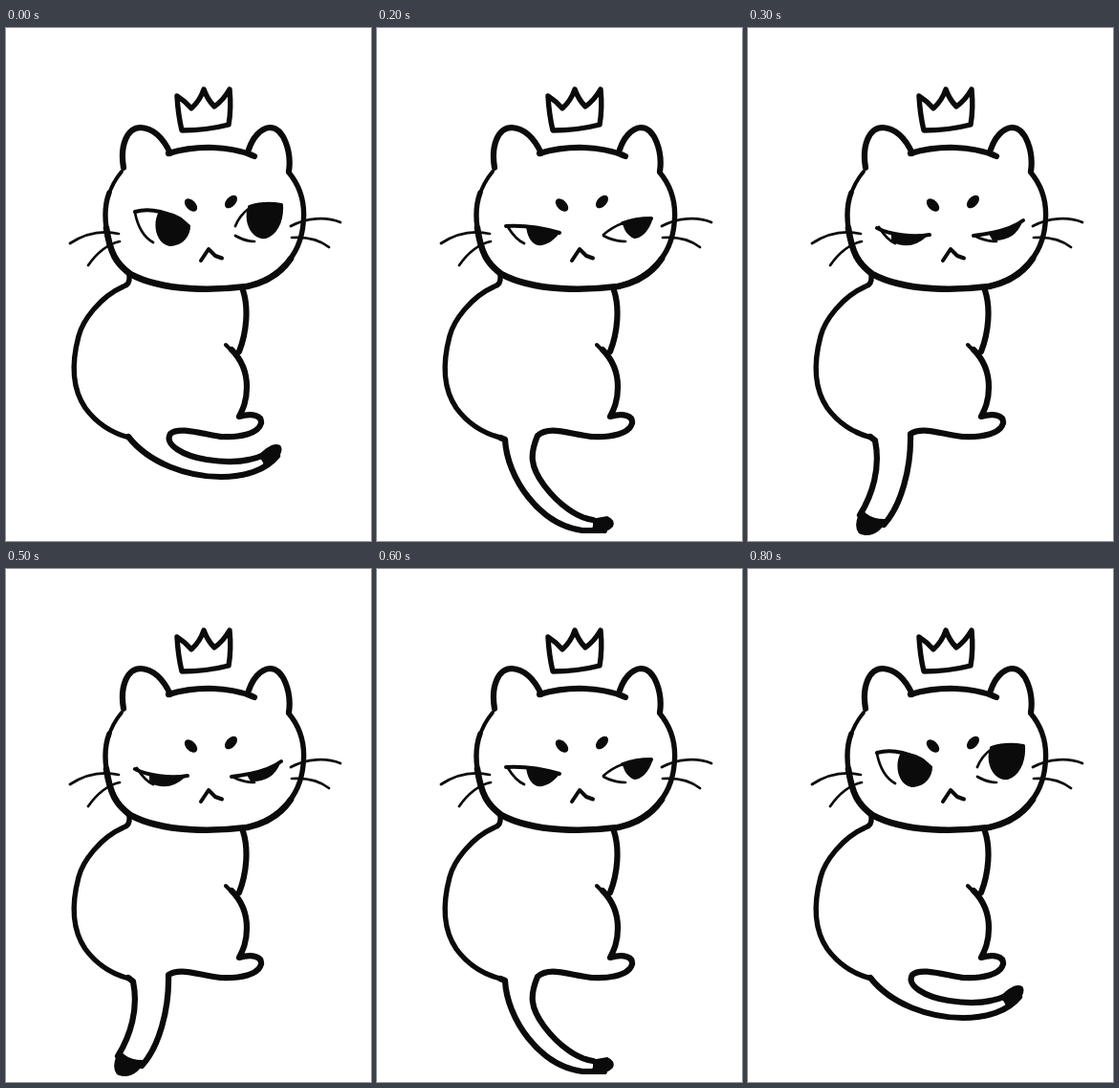
An HTML page that plays this animation: 382 by 536 pixels, repeating every 1 s.

```html
<!DOCTYPE html>
<html lang="en">
<head>
<meta charset="utf-8">
<title>Crowned cat</title>
<style>
  html, body { margin: 0; width: 100%; height: 100%; overflow: hidden; background: #fff; }
  svg { display: block; width: 100%; height: 100%; }
  path { fill: none; stroke: #0b0b0b; stroke-width: 6.2; stroke-linecap: round; stroke-linejoin: round; }
  .thin { stroke-width: 2.7; }
  .mid { stroke-width: 4; }
  .side { stroke-width: 5.4; }
  .fill, ellipse { fill: #0b0b0b; stroke: none; }
</style>
</head>
<body>
<svg viewBox="0 0 382 536">
  <!-- crown -->
  <path class="side" d="M184 107Q180 90 179 71Q187 76 194 84Q203 76 207 64Q211 75 218 82Q227 76 234 64Q236 84 233 101Q210 107 184 107Z"/>
  <!-- head -->
  <path d="M123 146C119 122 127 104 141 104C156 105 166 118 172 131M170 131C200 122 235 123 260 134M296 150C299 130 291 104 276 104C266 105 258 115 254 127"/>
  <path class="mid" d="M121 150Q111 162 107 176"/>
  <path class="side" d="M108 172Q102 188 105 209C109 235 115 245 130 257M252 270C285 262 308 238 311 205C314 180 306 163 296 151"/>
  <path d="M105 209C109 235 115 246 130 257C165 276 220 274 252 270C272 266 288 256 298 241" style="stroke-width:6.6"/>
  <path class="thin" d="M118 215C100 211 84 214 67 225M119 223C106 226 95 235 86 248M298 207C315 198 335 197 350 203M299 219C315 218 328 221 338 229"/>
  <ellipse rx="8" ry="5" transform="translate(193.5 185) rotate(45)"/>
  <ellipse rx="8" ry="5" transform="translate(235.5 181.5) rotate(-48)"/>
  <path class="mid" d="M204 243L212 231L219 238L226 240.5"/>
  <!-- body -->
  <path class="side" d="M129 259Q130 268 123 270C98 281 80 306 76 322C68 352 70 378 83 397C94 412 110 423 129 428"/>
  <path d="M248 274C254 292 252 318 244 338M236 336C246 346 252 360 252 375C252 390 248 398 244 406C258 402 268 405 267 413C264 424 245 428 225 427"/>
  <path class="mid" d="M230 331L242 343"/>
  <g id="poses"></g>
</svg>
<script>
const lowerLids = 'M137 208C142 216 147 222 154 225M237 217Q248 223 260 223';

// From alert with the tail curled right, to asleep with the tail swung left.
const poses = [
  {
    lids: 'M135 192C150 188 172 191 191 207M255 187Q270 182 288 185',
    lines: 'M135 193C138 208 145 219 154 224M240 207C243 199 248 193 255 188M240 217Q250 223 260 223',
    pupils: 'M160 192C180 191 191 203 193 209C191 222 181 228 171 228C156 225 153 203 160 192ZM254 186C265 182 280 182 290 185C291 202 284 216 272 220C256 222 247 200 254 186Z',
    tail: 'M225 427C205 424 180 416 172 424C165 435 185 447 210 451C235 455 255 453 270 446M128 427C150 455 190 469 225 469C250 469 272 462 284 447',
    tip: 'M263 448C270 440 280 432 287 436C292 442 284 454 269 462Q272 453 263 448Z'
  },
  {
    lids: 'M135 195C152 193 174 196 191 208M255 192Q270 188 288 190',
    lines: 'M136 196C139 209 145 219 154 224M238 210C243 201 248 196 255 192M240 217Q250 223 260 223',
    pupils: 'M158 195Q180 196 193 209C191 222 181 228 171 228C157 225 153 205 158 195ZM253 191Q270 187 290 189C290 204 284 216 272 220C257 221 249 203 253 191Z',
    tail: 'M225 427C200 424 182 416 168 427L168 437C180 460 215 476 258 473M128 427C145 455 180 490 225 491C245 491 265 488 275 478',
    tip: 'M257 471C266 467 276 465 279 471C280 482 268 491 253 491Q259 481 257 471Z'
  },
  {
    lids: 'M135 207C152 206 174 209 191 214M257 204Q270 199 287 199',
    lines: lowerLids + 'M237 216Q246 208 257 204',
    pupils: 'M156 207L191 214C184 224 175 228 168 227C160 224 157 216 156 207ZM257 204L289 198C285 213 276 220 269 220C262 217 258 210 257 204Z',
    tail: 'M225 427C200 424 180 415 168 426C160 445 160 458 175 478C190 498 210 512 226 514M129 428L134 430C136 470 170 519 215 525L238 525',
    tip: 'M224 513L241 510Q250 514 247 521Q240 529 222 528Q229 520 224 513Z'
  },
  {
    lids: 'M135 209C148 216 172 219 190 216M236 217C253 215 275 211 288 201',
    lines: lowerLids,
    pupils: 'M150 214Q170 220 188 217Q170 234 150 223ZM252 215Q272 212 287 203Q279 223 256 222Z',
    tail: 'M225 427C200 424 182 416 170 424C171 460 160 500 142 519M128 427L133 431C139 460 130 488 117 509',
    tip: 'M119 502Q127 514 145 513C141 526 128 534 116 528Q109 519 119 502Z'
  },
  {
    lids: '',
    lines: '',
    pupils: 'M133 207C146 222 168 225 191 215C180 235 143 233 133 207ZM234 215C254 222 277 218 290 200C285 226 261 230 234 215Z',
    tail: 'M225 427C200 424 182 416 172 424C150 455 115 487 70 488C50 488 37 482 27 473M128 427Q136 431 132 437C115 465 75 474 42 470',
    tip: 'M22 468C24 460 34 462 48 470Q41 478 42 487C31 483 20 475 22 468Z'
  }
];
const order = [0, 1, 2, 3, 4, 3, 2, 1, 0, 0];

const holder = document.getElementById('poses');
holder.innerHTML = poses.map(p => `<g>
  <path class="mid" d="${p.lids}"/>
  <path class="thin" d="${p.lines}"/>
  <path class="fill" d="${p.pupils}"/>
  <path d="${p.tail}"/>
  <path class="fill" d="${p.tip}"/>
</g>`).join('');
const groups = [...holder.children];

function draw() {
  const current = order[Math.floor(performance.now() % 1000 / 100)];
  groups.forEach((group, i) => group.style.display = i === current ? '' : 'none');
  requestAnimationFrame(draw);
}
draw();
</script>
</body>
</html>
```
